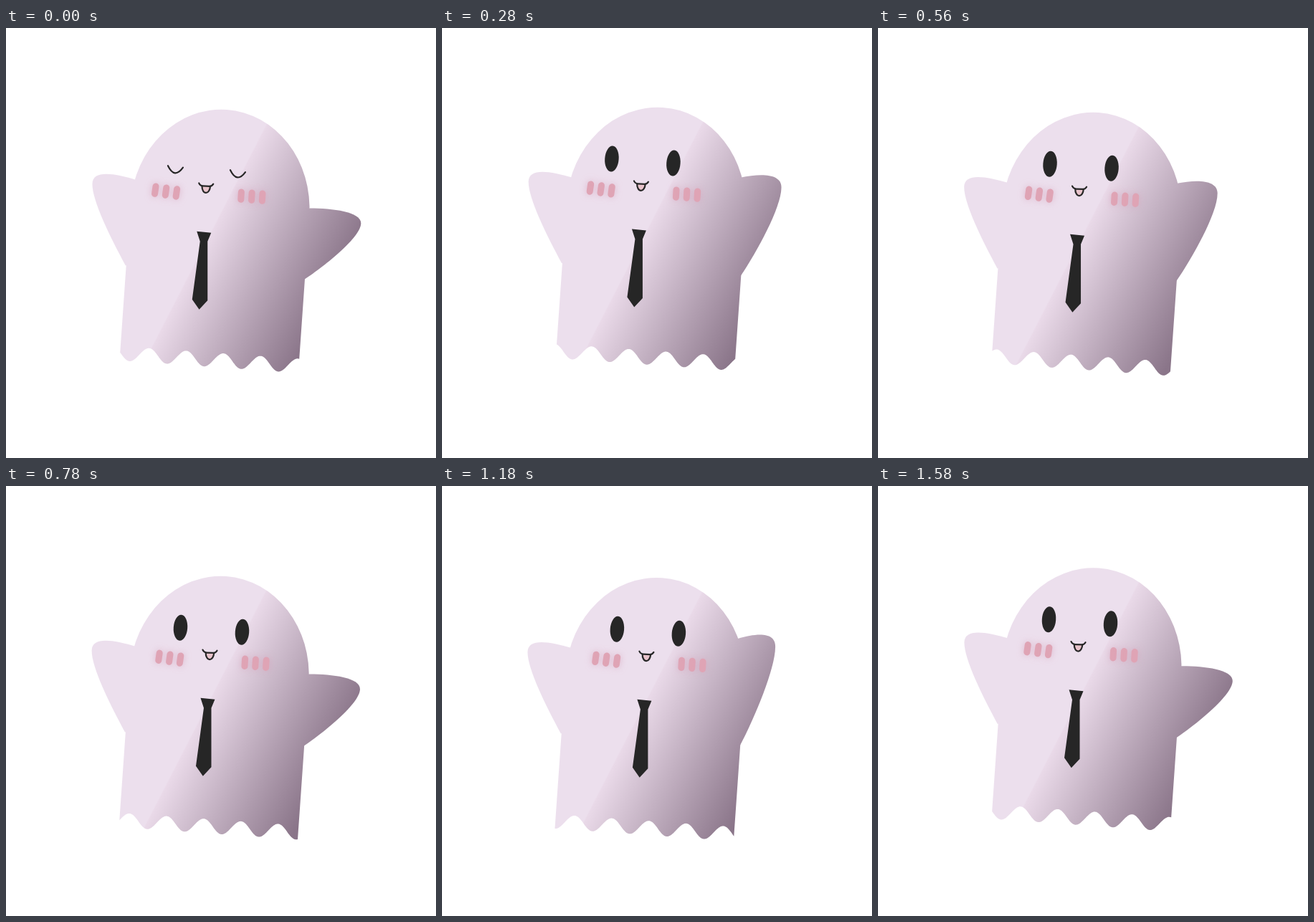
An HTML page with a canvas that plays this animation: 600 px wide and 600 px high, repeating every 1600 ms.

```html
<!DOCTYPE html>
<html>
<head>
<meta charset="utf-8">
<style>
  html, body { margin: 0; height: 100%; overflow: hidden; background: #fff; }
  canvas { display: block; }
</style>
</head>
<body>
<canvas id="stage" width="600" height="600"></canvas>
<script>
const ctx = document.getElementById('stage').getContext('2d');
const LOOP = 1600, BLINK = 160, TILT = 4 * Math.PI / 180, TAU = Math.PI * 2;
const INK = '#262626';

const armUp = [413, 204, 440, 196, 465, 194, 465, 215, 465, 246, 436, 316, 416, 355];
const armDown = [423, 258, 455, 258, 495, 263, 495, 279, 495, 298, 446, 337, 416, 357];
const leftArm = new Path2D('M180.5 218C150 209 120 204 120 224C120 248 145 298 166.5 338L230 280Z');
const tie = new Path2D('M269 290L289 292L284 304L284 386.5L272.3 399L262.5 385L273.5 304Z');
const tongue = new Path2D('M276.3 227C276 232 278.5 236.3 281.8 236.3C285 236.3 287.5 232 287.7 227.3');
const lip = new Path2D('M272 222.8Q273.8 226.6 277.5 226.8L287 227.2Q290.2 227 292 224');
const lids = new Path2D('M228.7 198.5Q238 217.5 249.7 201M315.7 204.5Q325 223.5 336.7 207.5');

const shade = ctx.createLinearGradient(290, 281, 459, 368);
shade.addColorStop(0, '#ecdfed');
shade.addColorStop(0.01, '#e9d9e8');
shade.addColorStop(1, '#8a7589');

function drawBody(t) {
  ctx.fillStyle = shade;
  ctx.fill(leftArm);

  const drop = (1 - Math.cos((t - 418) / 800 * TAU)) / 2;
  const a = armUp.map((v, i) => v + (armDown[i] - v) * drop);
  ctx.beginPath();
  ctx.moveTo(a[0], a[1]);
  ctx.bezierCurveTo(...a.slice(2, 8));
  ctx.bezierCurveTo(...a.slice(8));
  ctx.lineTo(370, 300);
  ctx.fill();

  // Domed head and a hem whose wave travels one wavelength per loop
  const cos = Math.cos(TILT), sin = Math.sin(TILT);
  const trough = -111 + 52 * t / LOOP;
  ctx.beginPath();
  ctx.ellipse(298, 260, 125, 140, TILT, Math.PI, TAU);
  for (let u = 125; u >= -125; u--) {
    const v = 209.5 + 10 * Math.cos((u - trough) / 52 * TAU);
    ctx.lineTo(298 + u * cos - v * sin, 260 + u * sin + v * cos);
  }
  ctx.fill();
}

function drawEye(x, y) {
  ctx.beginPath();
  ctx.ellipse(x, y, 9.7, 18, TILT, 0, TAU);
  ctx.fill();
}

function drawCheek(x, y, stepY, angle) {
  ctx.save();
  ctx.fillStyle = '#dfa4b5';
  ctx.shadowColor = 'rgba(214,160,185,.6)';
  ctx.shadowBlur = 10;
  for (let i = 0; i < 3; i++) {
    ctx.save();
    ctx.translate(x + i * 14.8, y + i * stepY);
    ctx.rotate(angle);
    ctx.beginPath();
    ctx.roundRect(-4.5, -9.7, 9, 19.4, 4.5);
    ctx.fill();
    ctx.restore();
  }
  ctx.restore();
}

function drawFace(t) {
  drawCheek(211, 232.5, 1.9, 0.14);
  drawCheek(330.8, 240.5, 1, 0.06);

  ctx.strokeStyle = ctx.fillStyle = INK;
  ctx.lineWidth = 2.2;
  ctx.lineCap = 'round';
  if (t < BLINK) {
    ctx.stroke(lids);
  } else {
    drawEye(241, 192);
    drawEye(327, 198);
  }
  ctx.fill(tie);

  ctx.fillStyle = '#e8c3cb';
  ctx.fill(tongue);
  ctx.stroke(tongue);
  ctx.stroke(lip);
}

function layer(dx, dy, draw, t) {
  ctx.save();
  ctx.translate(dx, dy);
  draw(t);
  ctx.restore();
}

function frame() {
  const t = performance.now() % LOOP;
  const bob = -Math.cos((t - 220) / LOOP * TAU);
  const dy = 9.7 * bob;
  ctx.clearRect(0, 0, 600, 600);
  layer(-0.07 * dy, dy, drawBody, t);
  layer(4.2 * bob, dy, drawFace, t);
  requestAnimationFrame(frame);
}
frame();
</script>
</body>
</html>
```
